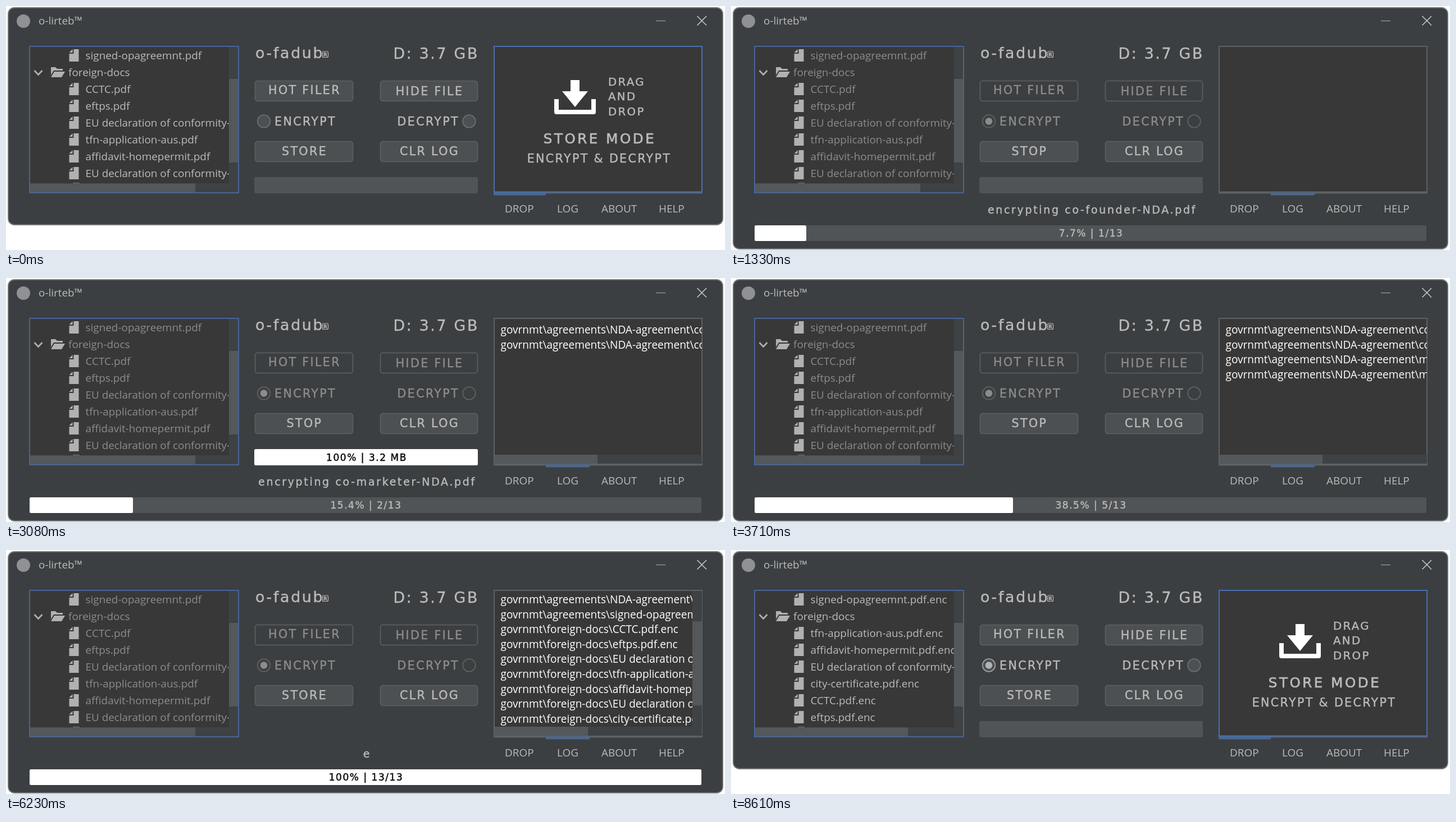
Recreate the animation shown at these times as an HTML page. Size 1280 by 435 pixels, loop 8.75 s.

```html
<!DOCTYPE html>
<html lang="en">
<head>
<meta charset="utf-8">
<title>File encryption window</title>
<style>
  html, body { margin: 0; width: 100%; height: 100%; overflow: hidden; background: #fff; }
  svg { display: block; width: 1280px; height: 435px; }
  text { font: 18.9px "Open Sans", "Noto Sans", sans-serif; color: #bbb; fill: currentColor; white-space: pre; }
  .tech {
    font: 20.6px "DejaVu Sans", sans-serif; letter-spacing: .115em;
    stroke: currentColor; stroke-width: .4;
  }
  .head { font-size: 26.8px; letter-spacing: .1em; }
  .mode { font-size: 24.5px; letter-spacing: .145em; stroke-width: .7; }
  .drag { font-size: 19.8px; }
  .note { font-size: 19px; letter-spacing: .14em; }
  .num { font-size: 17px; letter-spacing: .09em; }
  .reg { font: bold 9px "DejaVu Sans", sans-serif; }
  .log text { font-size: 19.05px; color: #fff; }
  .btn { fill: #4c5052; stroke: #5e6060; stroke-width: 1.6; }
  .radio { fill: #4c5052; stroke: #6b6d6e; stroke-width: 1.8; }
  .radio.on { stroke: #9c9ea0; }
  .dot { fill: #b0b2b4; }
  .thumb { fill: #55585a; }
  .track { fill: #3f4244; }
  .busy .lock text, .busy text.lock { color: #8c8c8c; }
  .busy .btn.lock { fill: #3c3f41; }
  .busy .radio { fill: #3c3f41; stroke: #5e6060; }
  .busy .dot { fill: #8a8c8e; }
</style>
</head>
<body>
<svg id="stage" viewBox="0 0 1280 435">
  <defs>
    <clipPath id="treeClip"><rect x="43" y="73" width="354" height="243"/></clipPath>
    <clipPath id="logClip"><rect id="logView" x="870" y="73" width="369" height="242"/></clipPath>
    <path id="file" d="M8 0H17V22H0V8H8Z M0 6L6 0V6Z" fill="#afb1b3"/>
  </defs>

  <rect id="win" x="4" y="3" width="1272" height="387" rx="11" fill="#3c3f41" stroke="#74777a" stroke-width="1.8"/>
  <circle cx="31" cy="27" r="12" fill="#8f9194"/>
  <text x="58" y="33">o-lirteb™</text>
  <path d="M1157 26.5H1174" stroke="#8f9194" stroke-width="1.4"/>
  <path d="M1230.5 18L1247 34.5M1247 18L1230.5 34.5" stroke="#c2c4c6" stroke-width="1.7"/>

  <rect x="42" y="72" width="372" height="261" fill="#383838"/>
  <rect class="track" x="397" y="73" width="16" height="259"/>
  <rect class="track" x="43" y="316" width="370" height="16"/>
  <rect class="thumb" x="397" y="130" width="16" height="149"/>
  <rect class="thumb" id="treeThumb" x="43" y="316.5" width="294" height="15.5"/>
  <g id="tree" class="lock" clip-path="url(#treeClip)">
    <path d="M50.5 115L57.5 122.500L64.500 115" fill="none" stroke="#afb1b3" stroke-width="2.6"/>
    <path d="M80 109H88L91 112H101V115H85L80 123Z M86 117H105L99 127H80Z" fill="#afb1b3"/>
    <text x="111" y="125">foreign-docs</text>
    <path d="M119 315.5H131" stroke="#77797b"/>
  </g>
  <rect x="42" y="72" width="372" height="261" fill="none" stroke="#4b6eaf" stroke-width="1.6"/>

  <text class="tech head" x="444" y="93">o-fadub</text>
  <rect x="563.5" y="81" width="10" height="10.500" rx="2" fill="none" stroke="#bbb" stroke-width="1.2"/>
  <text class="reg" x="565" y="89.5">R</text>
  <text class="tech head" x="842" y="94" text-anchor="end">D: 3.7 GB</text>

  <g id="buttons"></g>
  <circle class="radio" id="encRing" cx="459" cy="205.5" r="11.3"/>
  <circle class="dot" id="encDot" cx="459" cy="205.5" r="6.3"/>
  <text class="tech lock" x="478" y="212.5">ENCRYPT</text>
  <circle class="radio" cx="824.5" cy="205.5" r="11.3"/>
  <text class="tech lock" x="807" y="212.5" text-anchor="end">DECRYPT</text>
  <text class="tech note" id="note" x="643" y="369.5" text-anchor="middle"></text>

  <rect x="868" y="332" width="372" height="2.500" fill="#5e6163"/>
  <rect id="mark" y="332" height="5.5" fill="#4a688f"/>
  <rect id="pane" x="869" y="72" width="370" height="259.5" fill="#383838" stroke-width="2"/>
  <g id="drop">
    <path d="M1005 132H1021V152H1036L1013 180L990 152H1005Z" fill="#fff"/>
    <path d="M980 166V189H1046V166" fill="none" stroke="#fff" stroke-width="8" stroke-linejoin="round"/>
    <text class="tech drag" x="1072" y="142">DRAG</text>
    <text class="tech drag" x="1072" y="168">AND</text>
    <text class="tech drag" x="1072" y="195">DROP</text>
    <text class="tech mode" x="1057" y="245" text-anchor="middle">STORE MODE</text>
    <text class="tech" x="1056" y="278.5" text-anchor="middle">ENCRYPT &amp; DECRYPT</text>
  </g>
  <g id="log" class="log">
    <g clip-path="url(#logClip)"><g id="lines"></g></g>
    <g id="hBar">
      <rect class="track" x="870" y="315" width="369" height="16"/>
      <rect class="thumb" id="hThumb" x="870" y="315" height="16"/>
    </g>
    <g id="vBar">
      <rect class="track" x="1222" y="73" width="17" height="258"/>
      <rect class="thumb" id="vThumb" x="1222" width="17"/>
    </g>
  </g>
  <g id="tabs"></g>
</svg>

<script>
const LOOP = 8750, STEP = 70;
const START = 1050, DONE = 6230, CLOSE = 6300;
const SVG = 'http://www.w3.org/2000/svg';
const $ = id => document.getElementById(id);

function set(el, attrs) {
  for (const k in attrs) el.setAttribute(k, attrs[k]);
}
function add(parent, tag, attrs, content = '') {
  const el = document.createElementNS(SVG, tag);
  set(el, attrs);
  el.textContent = content;
  parent.append(el);
  return el;
}
const show = (el, on) => { el.style.display = on ? '' : 'none'; };
const label = (el, s) => { if (el.textContent !== s) el.textContent = s; };

// Progress bar whose caption turns dark where the fill covers it
function makeBar(id, x, y, w, h) {
  const g = add($('stage'), 'g', {});
  const clip = add(add(g, 'clipPath', { id }), 'rect', { x, y, height: h, width: 0 });
  add(g, 'rect', { x, y, width: w, height: h, rx: 3, fill: '#515456' });
  const fill = add(g, 'rect', { x, y, height: h, rx: 2.5, fill: '#fff' });
  const at = { class: 'tech num', x: x + w / 2 + 1, y: y + h / 2 + 6.3, 'text-anchor': 'middle' };
  const light = add(g, 'text', at);
  const dark = add(g, 'text', { ...at, style: 'color:#111', 'clip-path': `url(#${id})` });
  return (visible, part = 0, caption = '') => {
    show(g, visible);
    set(fill, { width: w * part });
    set(clip, { width: w * part });
    label(light, caption);
    label(dark, caption);
  };
}
const fileBar = makeBar('fileClip', 442, 305, 398, 29);
const totalBar = makeBar('totalClip', 42, 391, 1196, 28);

const buttons = [
  ['HOT FILER', 443, 133, 174, 157, 'lock'], ['HIDE FILE', 666, 133, 173, 159, 'lock'],
  ['STORE', 443, 241, 174, 266, ''], ['CLR LOG', 666, 241, 173, 266, '']
].map(([name, x, y, w, base, lock]) => {
  add($('buttons'), 'rect', { class: 'btn ' + lock, x: x + .5, y: y + .5, width: w, height: 36, rx: 4.5 });
  return add($('buttons'), 'text',
    { class: 'tech ' + lock, x: x + w / 2 + 1.5, y: base, 'text-anchor': 'middle' }, name);
});

[['DROP', 888], ['LOG', 981], ['ABOUT', 1060], ['HELP', 1162]]
  .forEach(([name, x]) => add($('tabs'), 'text', { x, y: 368 }, name));

const EU = 'EU declaration of conformity-signed.pdf';
const plain = ['signed-opagreemnt.pdf', 'CCTC.pdf', 'eftps.pdf', EU,
  'tfn-application-aus.pdf', 'affidavit-homepermit.pdf', EU];
const locked = ['signed-opagreemnt.pdf', 'tfn-application-aus.pdf', 'affidavit-homepermit.pdf', EU,
  'city-certificate.pdf', 'CCTC.pdf', 'eftps.pdf'].map(s => s + '.enc');
const rows = plain.map((_, i) => {
  const y = i ? 118 + i * 30 : 88;
  add($('tree'), 'use', { href: '#file', x: 112.5, y: y - 11 });
  return add($('tree'), 'text', { x: 141.5, y: y + 7 });
});

// path, time it is counted, time it is logged
const NDA = 'agreements\\NDA-agreement\\', FOREIGN = 'foreign-docs\\';
const jobs = [
  [NDA + 'co-founder-NDA.pdf', 1120, 1680],
  [NDA + 'co-marketer-NDA.pdf', 2450, 3080],
  [NDA + 'mutual-NDA.pdf', 3150, 3290],
  [NDA + 'mutual-NDA-short.pdf', 3430, 3570],
  [NDA + 'visitor-NDA.pdf', 3710, 3780],
  ['agreements\\signed-opagreemnt.pdf', 3850, 3990],
  [FOREIGN + 'CCTC.pdf', 4060, 4270],
  [FOREIGN + 'eftps.pdf', 4480, 4620],
  [FOREIGN + EU, 4690, 5250],
  [FOREIGN + 'tfn-application-aus.pdf', 5320, 5390],
  [FOREIGN + 'affidavit-homepermit.pdf', 5460, 5530],
  [FOREIGN + EU, 5600, 6020],
  [FOREIGN + 'city-certificate.pdf', 6090, 6160]
];
const PITCH = 26.6;
const lines = jobs.map(([path], i) =>
  add($('lines'), 'text', { x: 880.5, y: 99 + i * PITCH }, `govrnmt\\${path}.enc`));

// shown from, fill from, fill to, size in MB, caption
const uploads = [
  [1050, 1400, 2376, 5.11, 'co-founder-NDA.pdf'],
  [2450, 2450, 3080, 3.2, 'co-marketer-NDA.pdf'],
  [4690, 4690, 5250, 2.6, 'EU declaration'],
  [5600, 5600, 6020, 2.6, 'EU declaration']
];

const RESULT = 'encrypted 13 files';
function noteAt(t, upload) {
  if (upload) return 'encrypting ' + upload[4];
  if (t < DONE) return '';
  const n = t < 7560 ? 1 + Math.floor((t - DONE) / 44) : Math.round(18 * (8610 - t) / 1120);
  return RESULT.slice(0, Math.max(0, n));
}

function drawLog(n) {
  const tall = n >= 9;
  const scroll = tall ? (n - 9) * PITCH + 4 : 0;
  lines.forEach((el, i) => show(el, i < n));
  set($('lines'), { transform: `translate(0 ${-scroll})` });
  set($('logView'), { width: tall ? 352 : 369 });
  show($('hBar'), n > 0);
  show($('vBar'), tall);
  set($('hThumb'), { width: tall ? 166 : n > 1 ? 183 : 232 });
  set($('vThumb'), { y: 72 + scroll / 2, height: 243 * 243 / (n * PITCH + 48) });
}

function draw(time) {
  const t = Math.floor(time % LOOP / STEP) * STEP;
  const busy = t >= START && t < CLOSE;
  const after = t >= CLOSE;
  $('stage').classList.toggle('busy', busy);
  set($('win'), { height: busy ? 430 : 387 });

  const picked = t >= 140;
  $('encRing').classList.toggle('on', picked);
  show($('encDot'), picked);
  label(buttons[2], t >= START && t < DONE ? 'STOP' : 'STORE');

  rows.forEach((el, i) => label(el, (after ? locked : plain)[i]));
  set($('treeThumb'), { width: after ? 272 : 294 });

  show($('drop'), !busy);
  show($('log'), busy);
  set($('pane'), { stroke: busy ? '#5e6163' : '#4b6eaf' });
  set($('mark'), busy ? { x: 961, width: 78 } : { x: 868, width: 93 });
  drawLog(jobs.filter(j => t >= j[2]).length);

  const count = jobs.filter(j => t >= j[1]).length;
  const total = count / jobs.length;
  const percent = count === jobs.length ? '100' : (total * 100).toFixed(1);
  totalBar(busy, total, count ? `${percent}% | ${count}/${jobs.length}` : '');

  const upload = uploads.find(u => t >= u[0] && t <= u[2] + 60);
  if (upload) {
    const [, from, to, size] = upload;
    const part = Math.min(1, Math.max(0, (t - from) / (to - from)));
    const done = part === 1 ? '100' : (part * 100).toFixed(1);
    fileBar(true, part, part ? `${done}% | ${(part * size).toFixed(1)} MB` : '');
  } else fileBar(!busy);
  label($('note'), noteAt(t, upload));
}

const begin = performance.now();
function tick() {
  draw(performance.now() - begin);
  requestAnimationFrame(tick);
}
tick();
</script>
</body>
</html>
```
